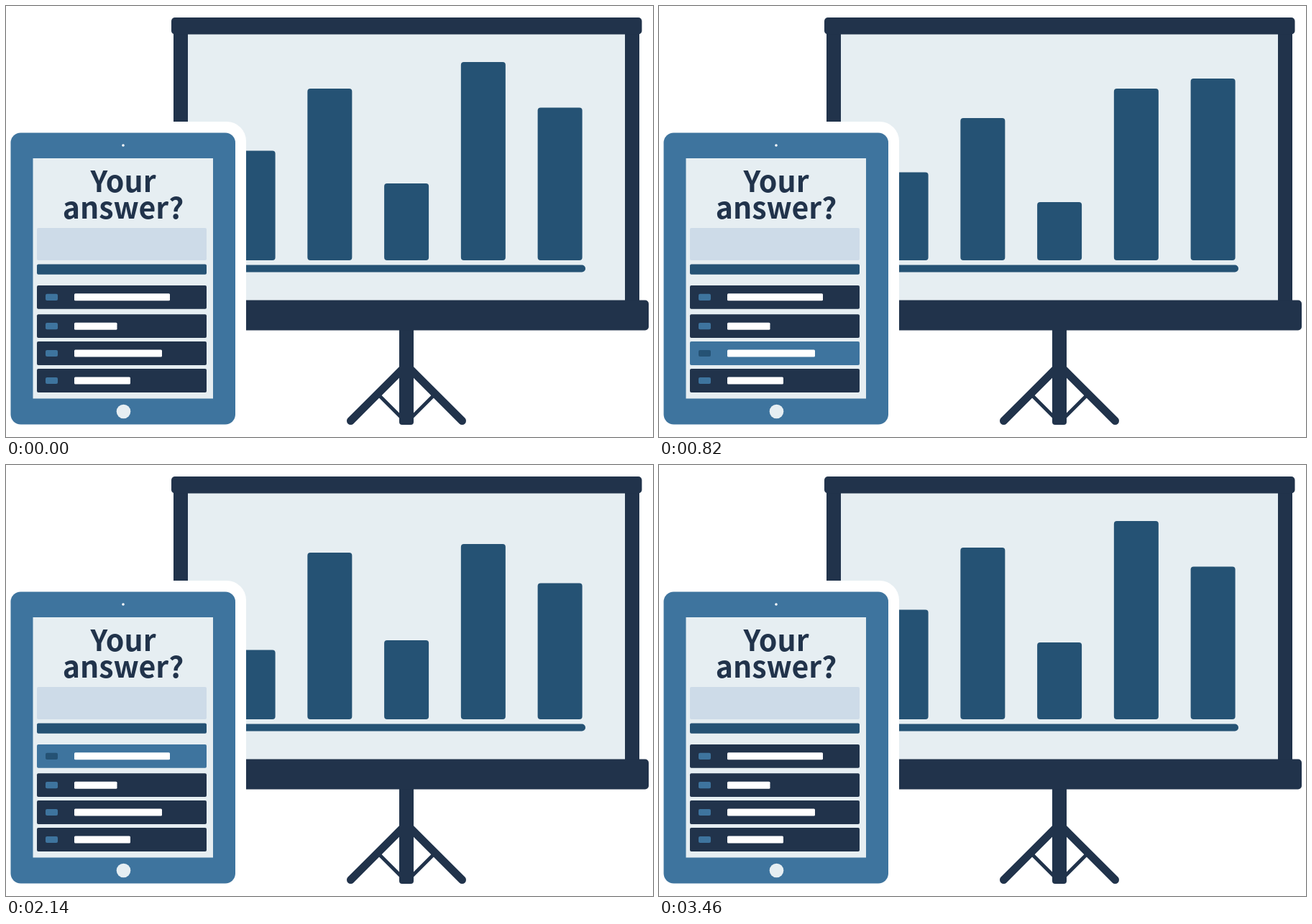
Animation of 900 by 600 pixels, one loop 3.49 s. Source, as an HTML page:

```html
<!DOCTYPE html>
<html lang="en">
<head>
<meta charset="utf-8">
<title>Live poll</title>
<style>
  html, body { margin: 0; width: 100%; height: 100%; overflow: hidden; background: #fff; }
  svg { display: block; width: 100%; height: 100%; }
  .dark { fill: #21334b; }
  .mid { fill: #255274; }
  .blue { fill: #3e749e; }
  .light { fill: #e6eef2; }
  .legs { fill: none; stroke: #21334b; }
  text {
    font: 700 41px "Noto Sans CJK JP", "Noto Sans CJK SC", "Noto Sans CJK", "Noto Sans", sans-serif;
    text-anchor: middle;
  }
</style>
</head>
<body>
<svg viewBox="0 0 900 600">
  <!-- projector screen -->
  <path class="legs" d="M557 500L479.5 577.5M557 500L634.5 577.5" stroke-width="11" stroke-linecap="round"/>
  <path class="legs" d="M518 541L551 574M596 541L563 574" stroke-width="5"/>
  <rect class="dark" x="547" y="440" width="20" height="143" rx="4"/>
  <rect class="dark" x="233" y="30" width="648" height="390"/>
  <rect class="dark" x="230" y="16" width="654.5" height="23.5" rx="5"/>
  <rect class="dark" x="220" y="409.5" width="674" height="42" rx="5"/>
  <rect class="light" x="253" y="39.5" width="608" height="370"/>
  <rect class="mid" x="300" y="360.5" width="506" height="10" rx="5"/>
  <g id="bars"></g>

  <!-- tablet -->
  <path d="M0 161H307A27 27 0 0 1 334 188V600H0Z" fill="#fff"/>
  <rect class="blue" x="6.5" y="176.5" width="312.5" height="406" rx="14"/>
  <rect class="light" x="37.5" y="212" width="250.5" height="334.5"/>
  <circle cx="163" cy="194" r="1.8" fill="#fff"/>
  <circle class="light" cx="163.5" cy="564.5" r="9.8"/>
  <text class="dark" x="163" y="259">Your</text>
  <text class="dark" x="163" y="296">answer?</text>
  <rect x="43" y="309" width="236" height="45" rx="2" fill="#cddbe8"/>
  <rect class="mid" x="43" y="359.5" width="236" height="14.3" rx="2"/>
  <g id="rows"></g>
</svg>
<script>
const LOOP = 3490, STEP = 30, STEPS = 5, FLOOR = 354;

// bar tops for each poll result
const RESULTS = [
  [201.5, 115, 247, 78, 141.5],
  [231.5, 156, 273, 115, 101],
  [257.5, 122, 244, 110, 164.5]
];
const SHIFTS = [700, 2020, 3340];

function addRect(parent, cls, x, y, width, height, rx) {
  const el = document.createElementNS("http://www.w3.org/2000/svg", "rect");
  const attrs = { class: cls, x, y, width, height, rx };
  for (const name in attrs) el.setAttribute(name, attrs[name]);
  return parent.appendChild(el);
}

const barBox = document.getElementById("bars");
const rowBox = document.getElementById("rows");

const bars = RESULTS[0].map((top, i) =>
  addRect(barBox, "mid", 312.6 + i * 106.75, top, 62, FLOOR - top, 4));

const rows = [[405.3, 133], [445.7, 59.5], [483.5, 122], [521.5, 78]].map(([cy, width]) => {
  const box = addRect(rowBox, "dark", 43, cy - 16.4, 236, 32.8, 2);
  const tick = addRect(rowBox, "blue", 55, cy - 4.6, 17, 9.2, 2);
  addRect(rowBox, "light", 95, cy - 5, width, 10, 1.5).style.fill = "#fff";
  return { box, tick };
});

function selectedRow(t) {
  if (t < 500 || t >= 3140) return -1;
  return t < 1820 ? 2 : 0;
}

function barTops(t) {
  let tops = RESULTS[0];
  SHIFTS.forEach((start, k) => {
    if (t < start) return;
    const from = RESULTS[k], to = RESULTS[(k + 1) % RESULTS.length];
    const p = Math.min(STEPS, Math.floor((t - start) / STEP) + 1) / STEPS;
    tops = from.map((y, i) => y + (to[i] - y) * p);
  });
  return tops;
}

function draw(t) {
  const chosen = selectedRow(t);
  rows.forEach(({ box, tick }, i) => {
    box.setAttribute("class", i === chosen ? "blue" : "dark");
    tick.setAttribute("class", i === chosen ? "mid" : "blue");
  });
  barTops(t).forEach((y, i) => {
    bars[i].setAttribute("y", y);
    bars[i].setAttribute("height", FLOOR - y);
  });
}

const begin = performance.now();
function tick() {
  draw((performance.now() - begin) % LOOP);
  requestAnimationFrame(tick);
}
tick();
</script>
</body>
</html>
```
